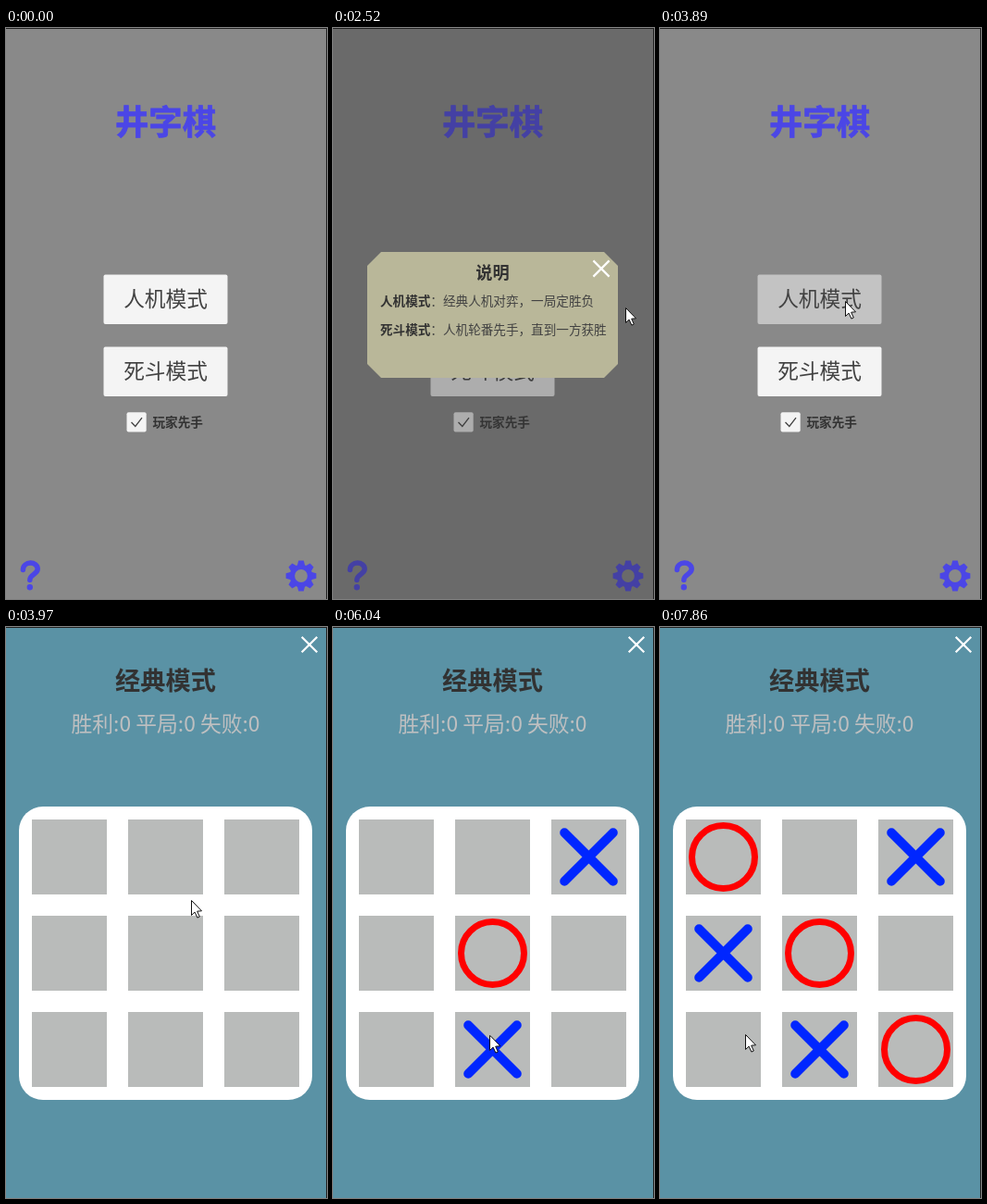
Recreate the animation shown at these times as an HTML page with a canvas. Size 347 by 617 pixels, loop 8000 ms.

```html
<!DOCTYPE html>
<html lang="zh-CN">
<head>
<meta charset="utf-8">
<title>井字棋</title>
<style>
html, body { margin: 0; width: 100%; height: 100%; overflow: hidden; background: #898989; }
canvas { display: block; width: 347px; height: 617px; }
</style>
</head>
<body>
<canvas id="stage" width="347" height="617"></canvas>
<script>
const W = 347, H = 617, MID = 172.5, LOOP = 8000, TICK = 47;
const g = document.getElementById('stage').getContext('2d');
const FONT = '"Noto Sans CJK SC", "Noto Sans CJK", sans-serif';
const BLUE = '#4b46e6', INK = '#323232', SOFT = '#424242', FACE = '#f4f4f4';

const HELP = [20, 585], CLOSE = [291, 265], PLAY = [200, 295];
const T = { help: 1630, popup: 1720, close: 2990, menu: 3080, play: 3890, game: 3970 };

const within = (t, a, b) => t >= a && t < b;
const mix = (a, b, u) => a + (b - a) * u;
const mixPoint = (a, b, u) => [mix(a[0], b[0], u), mix(a[1], b[1], u)];

// Each glide starts where the previous one ended; "via" bends it.
const glides = [];
function glide(start, end, to, via) {
  const from = glides.length ? glides[glides.length - 1].to : [113, 606];
  glides.push({ start, end, from, to, via: via || mixPoint(from, to, 0.5) });
}
glide(780, 1480, HELP);
glide(1770, 1900, [77, 568]);
glide(2100, 2850, CLOSE, [408, 384]);
glide(3220, 3730, PLAY);
glide(4250, 4820, [258, 262], [150, 402]);
glide(4960, 5190, [219, 401]);
glide(5340, 5890, [169, 441]);
glide(6040, 6220, [156, 469]);
glide(6790, 7150, [66, 350]);
glide(7200, 7540, [92, 440]);

function pointerAt(t) {
  const m = glides.filter(m => m.start <= t).pop();
  if (!m) return null;
  const steps = Math.round((m.end - m.start) / TICK);
  const step = Math.floor((t - m.start + 5) / (m.end - m.start) * steps);
  const s = 1 - Math.pow(1 - Math.min(1, step / steps), 2.3);
  return mixPoint(mixPoint(m.from, m.via, s), mixPoint(m.via, m.to, s), s);
}

// Moves alternate between the player's cross and the reply's circle.
const MOVES = [[4960, 2], [5340, 4], [6040, 7], [6510, 8], [7190, 3], [7860, 0]];

function text(s, x, cy, size, weight, color, align = 'center') {
  g.font = `${weight} ${size}px ${FONT}`;
  g.fillStyle = color;
  g.textAlign = align;
  g.fillText(s, x, cy + size * 0.355);
}

function box(x, y, w, h, r, color) {
  g.fillStyle = color;
  g.beginPath();
  g.roundRect(x, y, w, h, r);
  g.fill();
}

function polygon(points, color) {
  g.fillStyle = color;
  g.beginPath();
  points.forEach(p => g.lineTo(p[0], p[1]));
  g.closePath();
  g.fill();
}

function pen(color, width, cap = 'butt') {
  g.strokeStyle = color;
  g.lineWidth = width;
  g.lineCap = cap;
  g.beginPath();
}

function cross(x, y, r, width, color, cap) {
  pen(color, width, cap);
  g.moveTo(x - r, y - r); g.lineTo(x + r, y + r);
  g.moveTo(x + r, y - r); g.lineTo(x - r, y + r);
  g.stroke();
}

function ring(x, y, r, width, color) {
  pen(color, width);
  g.arc(x, y, r, 0, Math.PI * 2);
  g.stroke();
}

function helpIcon(color) {
  pen(color, 5.5, 'round');
  g.moveTo(18.4, 585.5);
  g.bezierCurveTo(18.4, 575.8, 34.2, 575.8, 34.2, 584.6);
  g.bezierCurveTo(34.2, 590.5, 25.8, 590, 25.8, 596.5);
  g.stroke();
  ring(25.8, 604.3, 1.6, 3.2, color);
}

function gearIcon(x, y) {
  ring(x, y, 9.6, 5.4, BLUE);
  for (let i = 0; i < 8; i++) {
    g.save();
    g.translate(x, y);
    g.rotate(i * Math.PI / 4);
    polygon([[-4.2, -11], [-2.8, -16.4], [2.8, -16.4], [4.2, -11]], BLUE);
    g.restore();
  }
}

function button(label, y, color) {
  box(105.5, y, 134, 53.5, 2, color);
  text(label, MID, y + 26.5, 22.7, 300, SOFT);
}

function menu(t) {
  g.fillStyle = '#898989';
  g.fillRect(0, 0, W, H);
  text('井字棋', MID, 102, 36.4, 700, BLUE);
  g.strokeStyle = BLUE;
  g.lineWidth = 0.8;
  g.strokeText('井字棋', MID, 102 + 36.4 * 0.355);

  button('人机模式', 266.5, t >= T.play ? '#c3c3c3' : t >= 3640 ? '#ebebeb' : FACE);
  button('死斗模式', 344.5, FACE);
  box(130.5, 415.2, 21.2, 21.2, 2, FACE);
  pen(SOFT, 1.3);
  g.moveTo(135.5, 426); g.lineTo(139.8, 430.5); g.lineTo(147, 421.2);
  g.stroke();
  text('玩家先手', 158.5, 426, 13.6, 700, INK, 'left');

  helpIcon(within(t, T.help, T.popup) ? '#3b37b6' : within(t, 1430, 1820) ? '#4843dd' : BLUE);
  gearIcon(319, 592);
}

function rule(name, detail, y) {
  text(name, 51, y, 13.6, 700, INK, 'left');
  text(detail, 51 + g.measureText(name).width, y, 13.6, 300, SOFT, 'left');
}

function popup(t) {
  g.fillStyle = 'rgba(56,56,56,0.38)';
  g.fillRect(0, 0, W, H);
  const l = 37, r = 308, a = 242, b = 378, c = 15;
  polygon([[l + c, a], [r - c, a], [r, a + c], [r, b - c],
           [r - c, b], [l + c, b], [l, b - c], [l, a + c]], '#b9b799');
  text('说明', MID, 265, 18.2, 700, INK);
  rule('人机模式', '：经典人机对弈，一局定胜负', 295);
  rule('死斗模式', '：人机轮番先手，直到一方获胜', 326);
  cross(290, 260, 8.6, 2.2, t >= T.close ? '#c8c8c8' : '#fff');
}

function game(t) {
  g.fillStyle = '#5a92a5';
  g.fillRect(0, 0, W, H);
  cross(328, 19, 8.3, 2.2, '#fff');
  text('经典模式', MID, 58, 27.2, 700, INK);
  text('胜利:0 平局:0 失败:0', MID, 105, 22.8, 300, '#bebfc0');
  box(14, 194, 317, 317, 26, '#fff');
  const center = i => [68.5 + i % 3 * 104, 248.5 + Math.floor(i / 3) * 104];
  for (let i = 0; i < 9; i++) {
    const [x, y] = center(i);
    box(x - 40.5, y - 40.5, 81, 81, 0, '#b9bbba');
  }
  MOVES.forEach(([at, cell], turn) => {
    if (t < at) return;
    if (turn % 2) ring(...center(cell), 34, 7, '#ff0000');
    else cross(...center(cell), 26.3, 10, '#0026ff', 'round');
  });
}

function pointer([x, y]) {
  g.save();
  g.translate(Math.round(x) + 0.5, Math.round(y) + 0.5);
  polygon([[0, 0], [0, 16], [3.6, 12.6], [6.4, 18.6], [8.8, 17.5], [6.2, 11.7], [11, 11.3]], '#fff');
  g.strokeStyle = '#111';
  g.lineWidth = 1;
  g.stroke();
  g.restore();
}

function draw(t) {
  if (t < T.game) {
    menu(t);
    if (within(t, T.popup, T.menu)) popup(t);
  } else {
    game(t);
  }
  g.fillStyle = '#222';
  g.fillRect(0, 0, W, 1);
  g.fillRect(W - 1, 0, 1, H);
  const p = pointerAt(t);
  if (p) pointer(p);
}

function frame() {
  draw(performance.now() % LOOP);
  requestAnimationFrame(frame);
}
frame();
</script>
</body>
</html>
```
